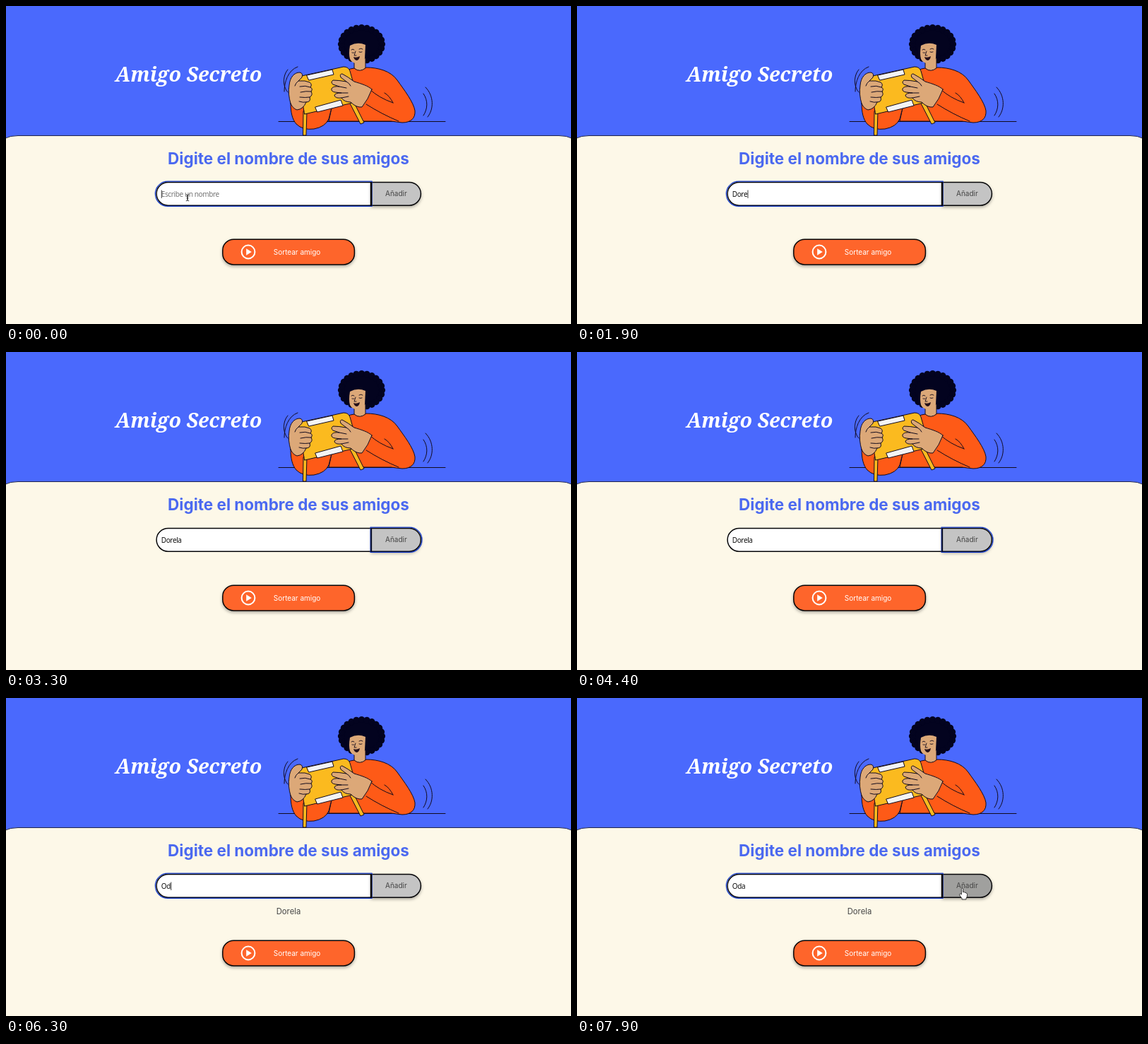
These frames come from a looping animation (800x450 px, 8000 ms). An HTML page:

```html
<!DOCTYPE html>
<html lang="es">
<head>
<meta charset="utf-8">
<title>Amigo Secreto</title>
<style>
  html, body { margin: 0; width: 100%; height: 100%; overflow: hidden; background: #fdf8e8; }
  svg { display: block; width: 100vw; height: 100vh; }
  text { font-family: Inter, sans-serif; font-optical-sizing: none; white-space: pre; }
  .title { font: italic 700 28.5px "Noto Serif", serif; fill: #fff; text-anchor: middle; }
  .heading { font-size: 22.5px; font-weight: 700; fill: #4b69f0; text-anchor: middle; }
  .label { font-size: 10px; }
  .field { font: 10px "Noto Sans", sans-serif; letter-spacing: -.39px; }
  .friend { font-size: 11.25px; fill: #444; text-anchor: middle; }
  .art { stroke: #120a1c; stroke-width: 1; stroke-linejoin: round; stroke-linecap: round; }
  .line { fill: none; }
  .skin { fill: #dca878; }
  .shirt { fill: #fe5a17; }
  .box { fill: #fbba1f; }
  .tape { fill: #f4f4f4; }
  .ring { fill: none; stroke: #1238c8; stroke-width: 1.3; }
  .raised { filter: drop-shadow(0 2px 2px rgba(0, 0, 0, .32)); }
</style>
</head>
<body>
<svg viewBox="0 0 800 450" preserveAspectRatio="none">
  <rect width="800" height="450" fill="#4a69fd"/>
  <path d="M-2 187.5Q6 183.5 17 183.5H783Q794 183.5 802 187.5V452H-2Z" fill="#fdf8e8" stroke="#10163a" stroke-width=".9"/>
  <text class="title" x="258.5" y="107">Amigo Secreto</text>

  <g class="art">
    <path class="line" d="M386 163.5H622M399 122C391 113 392 98 399 90M394 121C394 108 399 91 413 86M594 115C606 127 606 146 597 157M591 124C598 134 597 146 591 155"/>
    <g id="hair" fill="#03031f" stroke="none"><ellipse cx="503.5" cy="54" rx="30" ry="25"/></g>
    <path class="skin" d="M493 76V91Q501 96 509 89V74Z"/>
    <path class="skin" stroke="none" d="M487 56Q485 68 487 75Q490 81 497 81Q505 80 508 74L509 55Q498 50 487 56Z"/>
    <path class="line" stroke-width=".9" d="M489 62Q491 60 493 62M500 61Q503 59 505 61M490 66Q492 67 493 66M500 65Q502 66 504 65M495 64L493 70H496"/>
    <path d="M492 72Q496 74 501 71Q500 77 496 77Q493 76 492 72Z" fill="#26101a" stroke="none"/>
    <path class="shirt" d="M470 98Q483 89 493 88Q501 95 510 87C527 87 545 92 554 105C564 119 577 136 579 148C580 159 573 165 561 165Q552 164 545 163H457L462 140Z"/>
    <path class="line" d="M515 118Q528 130 548 137M536 123Q543 127 548 137M510 139Q532 153 556 163"/>
    <path class="shirt" d="M403 137C403 150 405 160 411 167Q420 176 436 174Q452 171 457 160L461 144L430 130Z"/>
    <path class="box" d="M421 149L420.5 183H425L426 149ZM485 134L502 167L507 165L491 133Z"/>
    <path class="box" d="M414 100L478 86Q485 86 487 92L498 131Q497 135 491 137L423 153Z"/>
    <path class="tape" d="M426 98L462 90L464 97L429 105ZM438 143L474 133L477 141L441 150Z"/>
    <path class="skin" d="M403 138Q399 125 401 112C402 101 408 94 416 94Q421 95 419 101L414 106Q424 105 430 108Q434 111 431 115Q435 117 432 121Q435 126 430 129Q432 136 425 136Q421 146 412 147Q406 145 403 138Z"/>
    <path class="line" d="M414 106Q410 109 409 113M416 114Q424 112 431 115M417 122Q425 120 432 121M416 129Q424 130 430 129M415 135Q421 137 425 136"/>
    <path class="skin" d="M518 118C513 113 503 110 493 107Q484 100 476 96Q472 96 474 101L482 107Q471 105 463 105Q459 108 463 111L472 114Q463 113 461 117Q460 121 466 122L475 123Q465 123 465 127Q467 131 475 130Q479 136 488 136Q496 144 504 143Q513 132 518 118Z"/>
    <path class="line" d="M482 107Q486 109 488 113M472 114L482 116M475 123L484 123M475 130L485 128"/>
  </g>

  <text class="heading" x="400" y="224">Digite el nombre de sus amigos</text>

  <path d="M517 249.4H229.5A16.4 16.4 0 0 0 229.5 282.2H517Z" fill="#fff" stroke="#050507" stroke-width="1.5"/>
  <g class="raised">
    <path id="add" d="M517.4 249.4H571A16.4 16.4 0 0 1 571 282.2H517.4Z" stroke="#050507" stroke-width="1.5"/>
  </g>
  <text class="label" x="537" y="269.3" fill="#444">Añadir</text>
  <g id="inputFocus">
    <path class="ring" d="M518 248.2H229A17.6 17.6 0 0 0 229 283.4H518Z"/>
    <path d="M517 249V283" stroke="#050507" stroke-width="2.4"/>
  </g>
  <g id="addFocus">
    <path class="ring" d="M516.2 248.2H571.4A17.6 17.6 0 0 1 571.4 283.4H516.2Z"/>
    <path d="M517 249V283" stroke="#0a1030" stroke-width="1.8"/>
  </g>
  <text class="field" id="typed" x="219.8" y="269.8"></text>
  <rect id="caret" y="260.5" width=".8" height="11.5" fill="#111"/>

  <text class="friend" id="friend" x="400" y="305.6"></text>

  <g id="draw">
    <rect class="raised" x="306.8" y="330.3" width="186.6" height="35.6" rx="15.5" fill="#fe652b" stroke="#050507" stroke-width="1.5"/>
    <circle cx="343" cy="348" r="9.4" fill="none" stroke="#fff" stroke-width="2"/>
    <path d="M340.2 343.2V352.8L347.8 348Z" fill="#fff"/>
    <text class="label" x="378.8" y="352" fill="#fff">Sortear amigo</text>
  </g>

  <g id="beam" fill="none" stroke="#222" stroke-width=".9">
    <path d="M-2.2 -4.2Q0 -4.2 0 -3V3.6Q0 4.8 -2.2 4.8M2.2 -4.2Q0 -4.2 0 -3V3.6Q0 4.8 2.2 4.8M-1.2 .9H1.2"/>
  </g>
  <path id="hand" fill="#fff" stroke="#111" stroke-width=".8" stroke-linejoin="round"
    d="M-2.6 1V-6.5Q-2.6 -7.8 -1.5 -7.8T-.4 -6.5V-2.2Q1.5 -3.2 2 -1.6Q3.6 -2.2 4 -.8Q5.5 -1 5.6 .8Q5.8 4.5 4 6.6V8H-2V6.5Q-4.2 4 -5.4 1.6Q-5.6 .2 -4.4 .2Q-3.4 .2 -2.6 1Z"/>
</svg>
<script>
const LOOP = 8000;
const FIRST = 'Dorela', SECOND = 'Oda';
const ADD_FOCUS = 2800, ADDED = 4600, BLINK = 500;

// [time, word, letters shown]; each entry restarts the caret blink
const KEYS = [
  [-300, FIRST, 0],
  [1600, FIRST, 1], [1700, FIRST, 2], [1800, FIRST, 3], [1900, FIRST, 4], [2100, FIRST, 5], [2300, FIRST, 6],
  [ADDED, SECOND, 0], [6000, SECOND, 1], [6300, SECOND, 2], [7000, SECOND, 3]
];
// [time, x, y]
const REST = [257, 271];
const MOUSE = [[7100, ...REST], [7300, 370, 274], [7500, 524, 280], [7700, 545, 278], [7900, 547, 277]];

const $ = id => document.getElementById(id);
const show = (id, on) => $(id).setAttribute('visibility', on ? 'visible' : 'hidden');

function growHair() {
  const count = 24;
  for (let i = 0; i < count; i++) {
    const a = i / count * Math.PI * 2;
    const c = document.createElementNS('http://www.w3.org/2000/svg', 'circle');
    c.setAttribute('cx', 503.5 + 29 * Math.cos(a));
    c.setAttribute('cy', 54 + 23.5 * Math.sin(a));
    c.setAttribute('r', 4.6);
    $('hair').append(c);
  }
}

function mouseAt(t) {
  if (t < 1600) return REST;
  if (t < MOUSE[0][0]) return null;
  for (let i = 1; i < MOUSE.length; i++) {
    const [t0, x0, y0] = MOUSE[i - 1], [t1, x1, y1] = MOUSE[i];
    if (t < t1) {
      const k = (t - t0) / (t1 - t0);
      return [x0 + (x1 - x0) * k, y0 + (y1 - y0) * k];
    }
  }
  return MOUSE[MOUSE.length - 1].slice(1);
}

function render(t) {
  const [since, word, shown] = KEYS.filter(k => k[0] <= t).pop();
  const onButton = t >= ADD_FOCUS && t < ADDED;
  const field = $('typed');
  field.textContent = shown ? word.slice(0, shown) : 'Escribe un nombre';
  field.setAttribute('fill', shown ? '#111' : '#757575');

  const end = shown ? field.getComputedTextLength() + .4 : 0;
  $('caret').setAttribute('x', 219.8 + end);
  show('caret', !onButton && Math.floor((t - since) / BLINK) % 2 === 0);
  show('inputFocus', !onButton);
  show('addFocus', onButton);

  const added = t >= ADDED;
  $('friend').textContent = added ? FIRST : '';
  $('draw').setAttribute('transform', `translate(0 ${added ? 13 : 0})`);

  const mouse = mouseAt(t);
  const hover = !!mouse && mouse[0] > 517;
  $('add').setAttribute('fill', hover ? '#a0a09e' : '#c4c4c4');
  show('beam', mouse && !hover);
  show('hand', hover);
  if (mouse) $(hover ? 'hand' : 'beam').setAttribute('transform', `translate(${mouse})`);
}

growHair();
const start = performance.now();
function tick() {
  render((performance.now() - start) % LOOP);
  requestAnimationFrame(tick);
}
tick();
</script>
</body>
</html>
```
